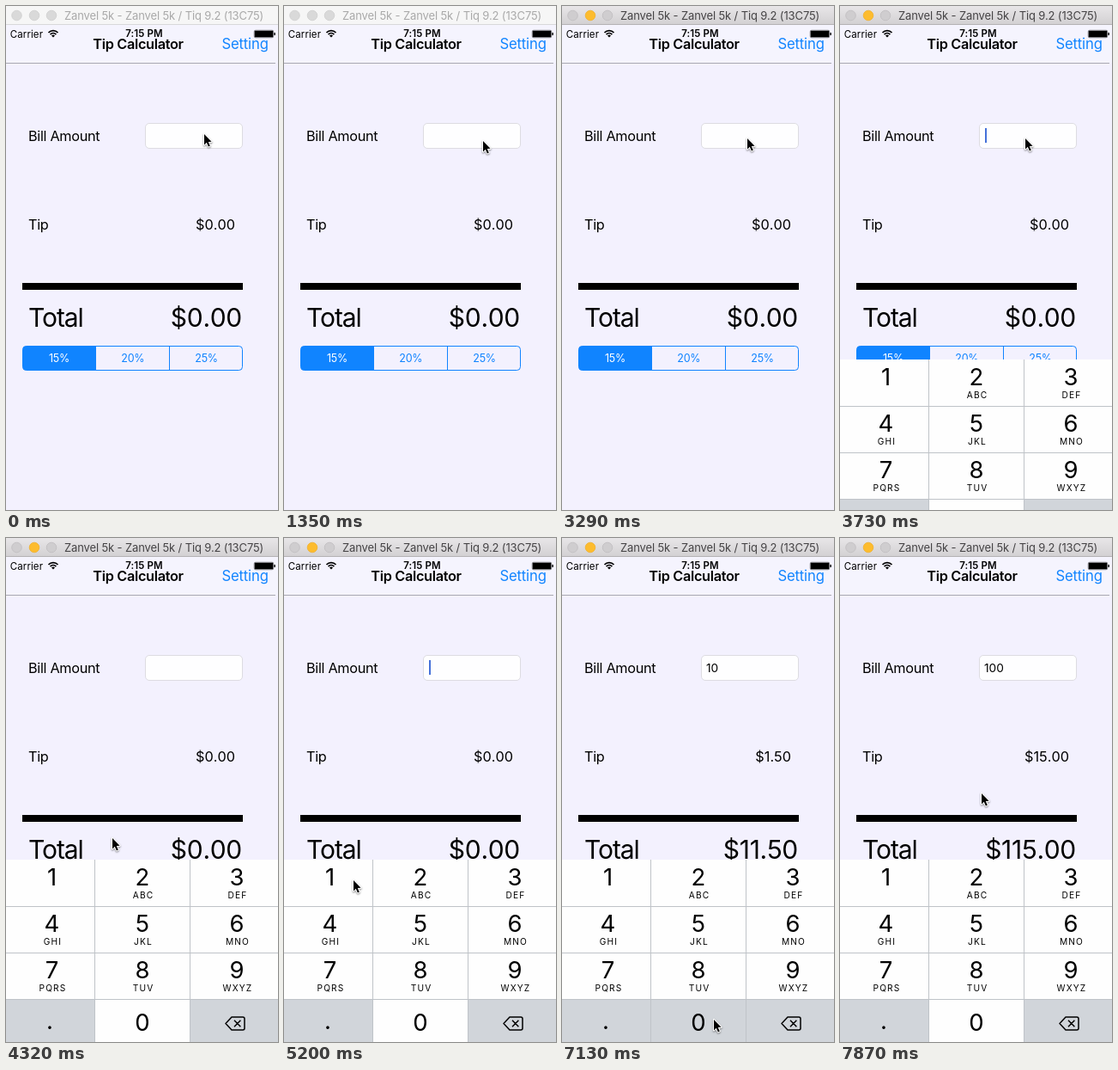
An HTML page with a canvas that plays this animation: 317 by 586 pixels, repeating every 8 s.

```html
<!DOCTYPE html>
<html lang="en">
<head>
<meta charset="utf-8">
<title>Tip Calculator</title>
<style>
html, body { margin: 0; width: 100%; height: 100%; overflow: hidden; background: #f3f1fe; }
canvas { display: block; width: 317px; height: 586px; }
</style>
</head>
<body>
<canvas id="stage"></canvas>
<script>
const W = 317, H = 586, LOOP = 8000;
const BLUE = '#1084ff', PAPER = '#f3f1fe', KEY_GREY = '#d1d5da';
const canvas = document.getElementById('stage');
const ctx = canvas.getContext('2d');
const dpr = window.devicePixelRatio || 1;
canvas.width = W * dpr;
canvas.height = H * dpr;

// Pointer path: time, x, y
const PATH = [
  [0, 231, 148], [1200, 231, 148], [1495, 234, 165], [1790, 228, 203],
  [1940, 222, 198], [2090, 217, 172], [2235, 216, 153],
  [3850, 216, 153], [4000, 190, 215], [4160, 146, 308], [4310, 124, 349],
  [4460, 112, 366], [4760, 90, 390], [5050, 81, 397], [5340, 81, 397],
  [5490, 190, 490], [5640, 208, 510], [5935, 215, 525], [6085, 215, 525],
  [6235, 203, 537], [6385, 186, 552], [6530, 177, 559],
  [7565, 177, 559], [7710, 172, 440], [7860, 165, 296], [LOOP, 165, 296]
];
// Typed text, pressed keys and caret visibility
const TYPED = [[0, ''], [5490, '1'], [6820, '10'], [7265, '100']];
const PRESSES = [['1', 5340, 5490], ['0', 6675, 6820], ['0', 7115, 7265]];
const CARET = [[3700, 4160], [4750, 5930], [6380, 7110], [7260, 7710]];
const KEYS = [
  ['1', ''], ['2', 'ABC'], ['3', 'DEF'],
  ['4', 'GHI'], ['5', 'JKL'], ['6', 'MNO'],
  ['7', 'PQRS'], ['8', 'TUV'], ['9', 'WXYZ'],
  ['.', ''], ['0', ''], ['back', '']
];
const COLS = [0, 104, 215, 317], ROWS = [374, 429, 483, 537, 586];
const KEY_X = [53.5, 159, 269];

const money = n => '$' + n.toFixed(2);
const within = (t, [a, b]) => t >= a && t < b;

function tick(t) {
  return t < 1346 ? 0 : 1346 + Math.floor((t - 1346) / 148.1) * 148.1;
}

function pointerAt(t) {
  const i = Math.max(1, PATH.findIndex(p => p[0] > t));
  const [t0, x0, y0] = PATH[i - 1], [t1, x1, y1] = PATH[i];
  const k = (t - t0) / (t1 - t0);
  return [Math.round(x0 + (x1 - x0) * k), Math.round(y0 + (y1 - y0) * k)];
}

function box(x, y, w, h, color) {
  ctx.fillStyle = color;
  ctx.fillRect(x, y, w, h);
}

function round(x, y, w, h, r) {
  ctx.beginPath();
  ctx.roundRect(x, y, w, h, r);
}

function label(str, x, y, size, o = {}) {
  ctx.font = `${o.weight || 400} ${size}px Inter, Roboto, sans-serif`;
  ctx.letterSpacing = (o.track ?? -0.02) * size + 'px';
  ctx.fontKerning = o.kern || 'normal';
  ctx.textAlign = o.align || 'left';
  ctx.fillStyle = o.color || '#000';
  ctx.fillText(str, x, y);
}

function titleBar(active) {
  const g = ctx.createLinearGradient(0, 0, 0, 22);
  g.addColorStop(0, active ? '#e8e6e8' : '#f6f6f6');
  g.addColorStop(1, active ? '#d2d0d2' : '#f6f6f6');
  box(0, 0, W, 22, g);
  box(0, 21, W, 1, active ? '#b4b2b4' : '#d8d8da');
  [12.5, 33, 53].forEach((x, i) => {
    const lit = active && i === 1;
    ctx.beginPath();
    ctx.arc(x, 11, 5.8, 0, Math.PI * 2);
    ctx.fillStyle = lit ? '#fdbc2e' : active ? '#cfcdcf' : '#d9d9d9';
    ctx.fill();
    ctx.strokeStyle = lit ? '#f0b02c' : active ? '#bfbdbf' : '#cfcfcf';
    ctx.lineWidth = 0.8;
    ctx.stroke();
  });
  label('Zanvel 5k - Zanvel 5k / Tiq 9.2 (13C75)', 68, 16, 13,
    { color: active ? '#454345' : '#a9a9a9', track: -0.01 });
}

function wifi(x, y) {
  ctx.strokeStyle = ctx.fillStyle = '#000';
  ctx.lineWidth = 1.7;
  for (const r of [4.8, 7.8]) {
    ctx.beginPath();
    ctx.arc(x, y, r, -Math.PI * 0.75, -Math.PI * 0.25);
    ctx.stroke();
  }
  ctx.beginPath();
  ctx.moveTo(x, y);
  ctx.arc(x, y, 2.8, -Math.PI * 0.75, -Math.PI * 0.25);
  ctx.fill();
}

function navBar() {
  box(0, 22, W, 44, '#f5f4fe');
  box(0, 66, 314, 1, '#a9a8b0');
  label('Carrier', 4.7, 37, 11.5, { track: 0.01 });
  wifi(55, 36.5);
  label('7:15 PM', 161, 36, 11.5, { weight: 600, align: 'center', track: 0.01 });
  ctx.strokeStyle = '#000';
  ctx.lineWidth = 0.6;
  round(289.3, 28.3, 22.4, 8.4, 1.5);
  ctx.stroke();
  box(290, 29, 21, 7, '#000');
  box(312.4, 31, 1.4, 3, '#000');
  label('Tip Calculator', 154, 50, 16.3, { weight: 600, align: 'center' });
  label('Setting', 305.7, 50, 16.7, { align: 'right', color: BLUE, track: -0.01 });
}

function billField(text, caret) {
  round(162.5, 136.5, 113, 29, 4.5);
  ctx.fillStyle = '#fefeff';
  ctx.fill();
  ctx.strokeStyle = '#dddce2';
  ctx.lineWidth = 1;
  ctx.stroke();
  label(text, 168, 156, 13.7, { track: 0 });
  if (caret) {
    const w = text ? ctx.measureText(text).width : 0;
    box(Math.round(169 + w), 142, 2, 17, '#4571d9');
  }
}

function segments() {
  ctx.save();
  round(19.5, 395.5, 256, 28, 4);
  ctx.clip();
  box(19, 395, 86, 29, BLUE);
  box(190, 395, 1, 29, BLUE);
  ctx.restore();
  round(19.5, 395.5, 256, 28, 4);
  ctx.strokeStyle = BLUE;
  ctx.lineWidth = 1;
  ctx.stroke();
  ['15%', '20%', '25%'].forEach((s, i) =>
    label(s, 62 + i * 85.8, 414, 12.5, { align: 'center', color: i ? BLUE : '#fff' }));
}

function backspace(x, y) {
  ctx.strokeStyle = '#000';
  ctx.lineWidth = 1.5;
  ctx.lineJoin = 'round';
  ctx.beginPath();
  ctx.moveTo(x, y);
  ctx.lineTo(x + 7, y - 7.5);
  ctx.lineTo(x + 20, y - 7.5);
  ctx.quadraticCurveTo(x + 22, y - 7.5, x + 22, y - 5.5);
  ctx.lineTo(x + 22, y + 5.5);
  ctx.quadraticCurveTo(x + 22, y + 7.5, x + 20, y + 7.5);
  ctx.lineTo(x + 7, y + 7.5);
  ctx.closePath();
  ctx.moveTo(x + 10, y - 3.7);
  ctx.lineTo(x + 17.4, y + 3.7);
  ctx.moveTo(x + 17.4, y - 3.7);
  ctx.lineTo(x + 10, y + 3.7);
  ctx.stroke();
}

function keypad(t) {
  const k = Math.min(1, Math.max(0, (t - 3540) / 400));
  if (!k) return;
  const down = PRESSES.find(p => within(t, [p[1], p[2]]));
  ctx.save();
  ctx.translate(0, Math.round(212 * (1 - k) ** 3));
  box(0, 374, W, 212, '#fefefe');
  KEYS.forEach(([key, sub], i) => {
    const c = i % 3, r = Math.floor(i / 3), x = COLS[c], y = ROWS[r];
    const dot = key === '.', lift = r ? 1 : 0;
    const grey = (dot || key === 'back') !== Boolean(down && down[0] === key);
    if (grey) box(x, y, COLS[c + 1] - x, ROWS[r + 1] - y, KEY_GREY);
    if (key === 'back') backspace(256, 564.5);
    else label(key, KEY_X[c] - (dot ? 2.5 : 0), r < 3 ? y + 30 - lift : dot ? 571 : 573, 27.5,
      { align: 'center', track: 0 });
    if (sub) label(sub, KEY_X[c] + 1, y + 45 - lift, 10.2, { align: 'center', track: 0.11 });
  });
  for (const y of ROWS.slice(1, 4)) box(0, y - 1, W, 1, '#bfc3c8');
  for (const x of COLS.slice(1, 3)) box(x - 1, 374, 1, 212, '#bfc3c8');
  ctx.restore();
}

function pointer(x, y) {
  const pts = [0, 0, 0, 12.4, 2.8, 9.8, 4.9, 14.4, 6.8, 13.6, 4.8, 9, 8.6, 8.8];
  ctx.save();
  ctx.translate(x, y + 1);
  ctx.beginPath();
  for (let i = 0; i < pts.length; i += 2) ctx.lineTo(pts[i], pts[i + 1]);
  ctx.closePath();
  ctx.lineJoin = 'round';
  ctx.lineWidth = 2.2;
  ctx.strokeStyle = '#fff';
  ctx.shadowColor = 'rgba(0, 0, 0, 0.45)';
  ctx.shadowBlur = 2 * dpr;
  ctx.shadowOffsetY = dpr;
  ctx.stroke();
  ctx.shadowColor = 'transparent';
  ctx.fillStyle = '#000';
  ctx.fill();
  ctx.restore();
}

function draw(time) {
  const t = tick(time);
  const text = TYPED.filter(e => e[0] <= t).pop()[1];
  const bill = Number(text), tip = bill * 0.15;
  ctx.setTransform(dpr, 0, 0, dpr, 0, 0);
  box(0, 0, W, H, PAPER);
  navBar();
  titleBar(t >= 3260);
  label('Bill Amount', 26, 157, 16.3);
  billField(text, CARET.some(c => within(t, c)));
  label('Tip', 26, 260, 16.3);
  label(money(tip), 267, 260, 16.3, { align: 'right', track: 0, kern: 'none' });
  box(19, 322, 257, 8, '#000');
  label('Total', 26, 373, 30, { track: -0.035 });
  label(money(bill + tip), 275, 373, 30, { align: 'right', track: -0.01, kern: 'none' });
  segments();
  keypad(t);
  pointer(...pointerAt(t));
}

const start = performance.now();
function loop() {
  draw((performance.now() - start) % LOOP);
  requestAnimationFrame(loop);
}
loop();
</script>
</body>
</html>
```
